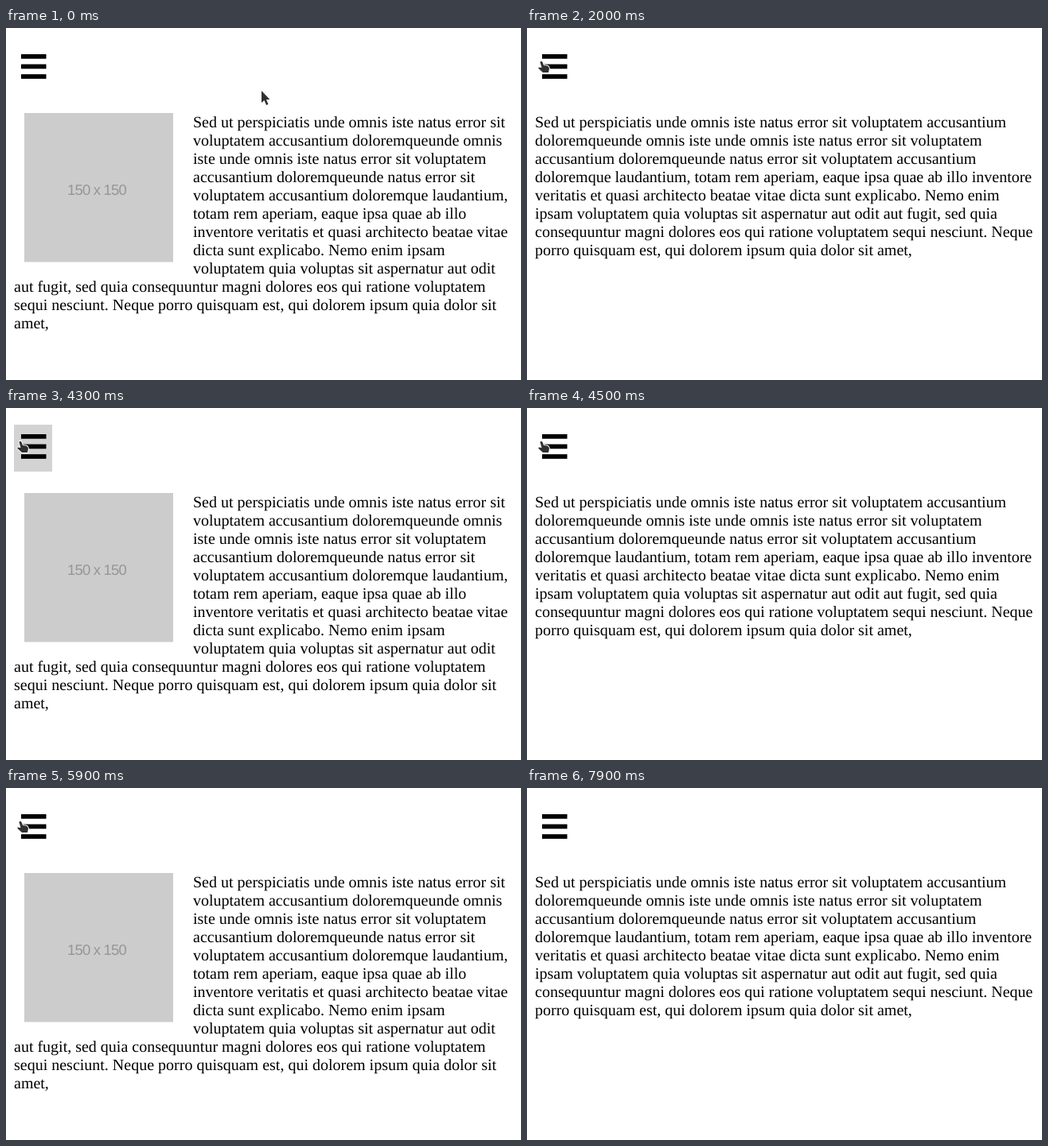
An HTML page with a canvas for the animation above (8.4 s loop, 647x443 px).

```html
<!DOCTYPE html>
<html lang="la">
<head>
<meta charset="utf-8">
<title>Toggle image</title>
<style>
  html, body { margin: 0; width: 100%; height: 100%; overflow: hidden; background: #fff; }
  canvas { display: block; }
</style>
</head>
<body>
<canvas id="stage" width="647" height="443"></canvas>
<script>
const ctx = document.getElementById('stage').getContext('2d');
const W = 647, H = 443, LOOP = 8400, STEP = 100;
const LEFT = 10, RIGHT = 637, TOP = 107, LINE = 23;

const words = ('Sed ut perspiciatis unde omnis iste natus error sit voluptatem accusantium ' +
  'doloremqueunde omnis iste unde omnis iste natus error sit voluptatem accusantium ' +
  'doloremqueunde natus error sit voluptatem accusantium doloremque laudantium, totam rem ' +
  'aperiam, eaque ipsa quae ab illo inventore veritatis et quasi architecto beatae vitae ' +
  'dicta sunt explicabo. Nemo enim ipsam voluptatem quia voluptas sit aspernatur aut odit ' +
  'aut fugit, sed quia consequuntur magni dolores eos qui ratione voluptatem sequi nesciunt. ' +
  'Neque porro quisquam est, qui dolorem ipsum quia dolor sit amet,').split(' ');

const presses = [1800, 3000, 4300, 5700];
const toggles = [2000, 3200, 4500, 5900, 7200];

const arrow = [[0, 0], [0, 15], [3.5, 12], [6, 18], [8.5, 17], [6, 11], [10.5, 11]];
const hand = [[-1.5, 1], [-1, 0], [0.5, 0], [1.5, 1], [3, 5], [7, 5.5], [9, 6.5],
  [10, 9], [9, 14], [2, 14], [-3.5, 9], [-3.5, 7.5], [0.5, 8]];

function paragraph(floated) {
  ctx.font = '20px "Liberation Serif", "Times New Roman", serif';
  ctx.fillStyle = '#000';
  let line = '', row = 0;
  const start = () => floated && row < 9 ? 235 : LEFT;
  const flush = () => ctx.fillText(line, start(), TOP + 18 + LINE * row++);
  for (const word of words) {
    const next = line ? line + ' ' + word : word;
    if (start() + ctx.measureText(next).width > RIGHT) {
      flush();
      line = word;
    } else {
      line = next;
    }
  }
  flush();
}

function placeholder() {
  ctx.fillStyle = '#ccc';
  ctx.fillRect(23, TOP, 187, 187.5);
  ctx.font = '18.5px "Liberation Sans", Arial, sans-serif';
  ctx.letterSpacing = '-0.8px';
  ctx.fillStyle = '#969696';
  ctx.fillText('150 x 150', 77, 210);
  ctx.letterSpacing = '0px';
}

function menuButton(pressed) {
  if (pressed) {
    ctx.fillStyle = '#d3d3d3';
    ctx.fillRect(10, 21, 48, 59);
  }
  ctx.fillStyle = '#000';
  for (let i = 0; i < 3; i++) ctx.fillRect(19, 33 + 12.6 * i, 31.5, 5.7);
}

// The pointer is sampled in steps, so it jumps rather than glides.
function pointerAt(t) {
  if (t < 7600) {
    const n = Math.min(9, Math.max(0, Math.floor((t - 400) / STEP) + 1));
    const u = n / 9, e = u * u * (3 - 2 * u);
    return [321 - 303 * e, 79 - 37 * e];
  }
  const u = Math.min(4, Math.floor((t - 7600) / STEP) + 1) / 4;
  return [18 + 18 * u, 42 - 63 * u ** 1.3];
}

function pointer([x, y]) {
  const over = x >= 10 && x < 58 && y >= 21 && y < 80;
  ctx.save();
  ctx.translate(x, y);
  ctx.beginPath();
  for (const [px, py] of over ? hand : arrow) ctx.lineTo(px, py);
  ctx.closePath();
  ctx.lineJoin = 'round';
  ctx.lineWidth = 2;
  ctx.strokeStyle = '#fff';
  ctx.stroke();
  ctx.fillStyle = '#303030';
  ctx.fill();
  ctx.restore();
}

function draw(now) {
  const t = now % LOOP;
  const shown = toggles.filter(at => t >= at).length % 2 === 0;
  ctx.fillStyle = '#fff';
  ctx.fillRect(0, 0, W, H);
  menuButton(presses.some(at => t >= at && t < at + 200));
  if (shown) placeholder();
  paragraph(shown);
  if (t < 7900) pointer(pointerAt(t));
  requestAnimationFrame(() => draw(performance.now()));
}

ctx.textRendering = 'geometricPrecision';
draw(performance.now());
</script>
</body>
</html>
```
